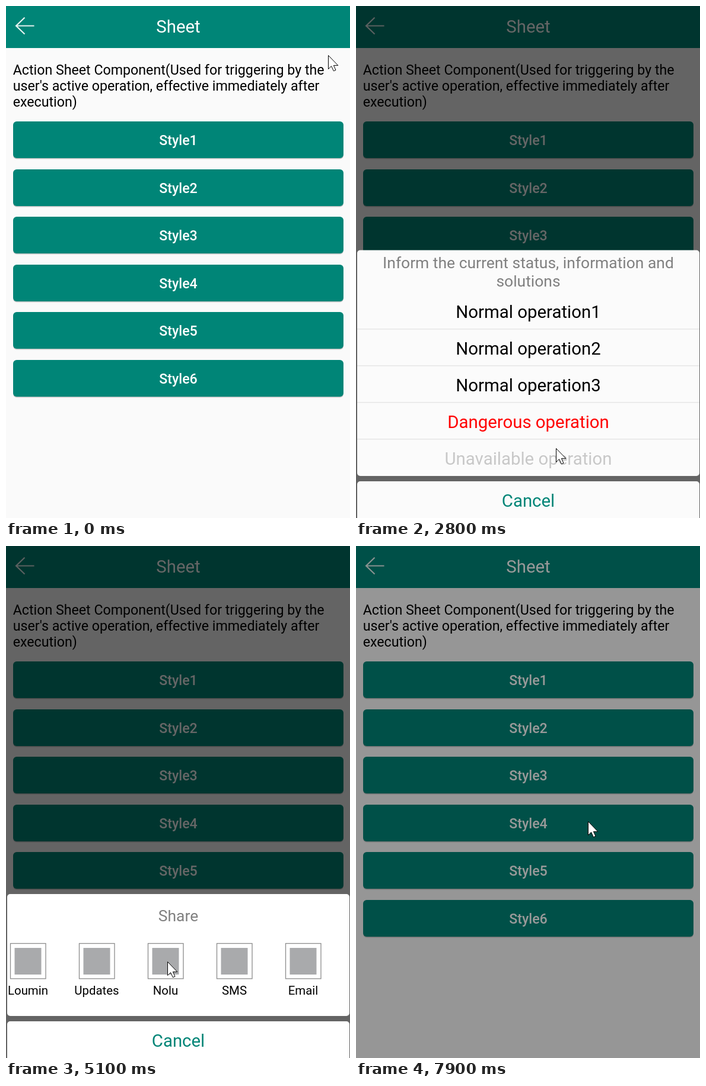
Recreate the animation shown at these times as an HTML page. Size 580x865 px, loop 8000 ms.

```html
<!DOCTYPE html>
<html lang="en">
<head>
<meta charset="utf-8">
<title>Sheet</title>
<style>
html, body { margin: 0; width: 100%; height: 100%; overflow: hidden; }
svg { display: block; width: 580px; height: 865px; background: #fafafa; font-family: Roboto, sans-serif; }
</style>
</head>
<body>
<svg id="stage" viewBox="0 0 580 865"></svg>
<script>
const LOOP = 8000, STEP = 100, MID = 290.5, DIM = 0.6;
const SMALL = 23.2, MEDIUM = 26.45, LARGE = 29.4;
const TEAL = '#008577', GRAY = '#808080', PALE = '#c8c8c8';
const stage = document.getElementById('stage');

function add(parent, tag, attrs, content) {
  const el = document.createElementNS('http://www.w3.org/2000/svg', tag);
  for (const key in attrs) el.setAttribute(key, attrs[key]);
  if (content) el.textContent = content;
  return parent.appendChild(el);
}
const rect = (parent, x, y, width, height, fill, rx = 0, more = {}) =>
  add(parent, 'rect', { x, y, width, height, fill, rx, ...more });
const text = (parent, str, x, y, size, fill = '#000', more = {}) =>
  add(parent, 'text', { x, y, 'font-size': size, fill, ...more }, str);
const centered = (parent, str, x, y, size, fill, more = {}) =>
  text(parent, str, x, y, size, fill, { 'text-anchor': 'middle', ...more });

// Page
rect(stage, 0, 0, 580, 71, TEAL);
add(stage, 'path', { d: 'M47.5 33.5H17M31.5 19.5L17 33.5L31.5 47.5', fill: 'none', stroke: '#e4f2f0', 'stroke-width': 2.2 });
centered(stage, 'Sheet', MID, 45, LARGE, '#fff');
['Action Sheet Component(Used for triggering by the',
 "user's active operation, effective immediately after",
 'execution)'].forEach((line, i) => text(stage, line, 11.7, 115.5 + 27 * i, SMALL));
for (let i = 0; i < 6; i++) {
  const y = Math.round(195 + 80.6 * i);
  rect(stage, 12, y + 1.5, 557, 62, '#000', 6, { opacity: 0.22 });
  rect(stage, 12, y, 557, 62, TEAL, 6);
  centered(stage, 'Style' + (i + 1), MID, y + 39.5, SMALL, '#fff', { 'font-weight': 500 });
}
const shade = rect(stage, 0, 0, 580, 865, '#000');

// Sheets
const sheets = [];
function makeSheet(top, open, close, fill = '#fff') {
  const g = add(stage, 'g', {});
  rect(g, 2, top, 577, 794 - top, fill, 5);
  rect(g, 2, 803, 577, 72, fill, 5);
  centered(g, 'Cancel', MID, 846, LARGE, TEAL);
  sheets.push({ g, top, open, close });
  return g;
}
function addRows(g) {
  ['Normal operation1', 'Normal operation2', 'Normal operation3',
   'Dangerous operation', 'Unavailable operation'].forEach((label, i) => {
    centered(g, label, MID, 527 + 62 * i, LARGE, ['#000', '#000', '#000', '#f00', PALE][i]);
    if (i) rect(g, 2, 483 + 62 * i, 577, 1.5, '#e6e6e6');
  });
}

addRows(makeSheet(484, 700, 1600, '#fbfbfb'));

const info = makeSheet(412.5, 2200, 3200, '#fbfbfb');
centered(info, 'Inform the current status, information and', MID, 443, MEDIUM, GRAY);
centered(info, 'solutions', MID, 474, MEDIUM, GRAY);
addRows(info);

const share = makeSheet(588, 4000, 5400);
centered(share, 'Share', MID, 634, MEDIUM, GRAY);
add(add(stage, 'clipPath', { id: 'card' }), 'rect', { x: 2, y: 588, width: 577, height: 206 });
const strip = add(add(share, 'g', { 'clip-path': 'url(#card)' }), 'g', {});
['VV', 'Loumin', 'Updates', 'Nolu', 'SMS', 'Email'].forEach((label, i) => {
  const x = 79 + 116 * i;
  rect(strip, x - 29.5, 671.5, 59.5, 59.5, '#fff', 0, { stroke: '#8c8c8c', 'stroke-width': 1.3 });
  rect(strip, x - 22.5, 679, 45, 45, '#a9aaac');
  centered(strip, label, x, 757.5, 20.4);
});

const file = makeSheet(458, 6200, 7800);
centered(file, 'File name', MID, 504, MEDIUM, GRAY);
text(file, 'Link address:', 19.7, 567, MEDIUM);
['https://www.baidu.com/link?url', '=eZH1yw2u1h-CNrpm7Q3jD', '_EfVnUxwUuBHlTGhLlA',
 '_KfhwtG0TGSl4a7kPsJNMqE8&wd', '=&eqid=f50ccdfc00009400000000', '065b232f14'
].forEach((line, i) => text(file, line, 195, 567 + 27 * i, SMALL, PALE));
text(file, 'Retrieve password:', 19.5, 760, MEDIUM);
rect(file, 262.5, 724.5, 127.5, 51, '#7accbd');
centered(file, '3854', 326, 759, SMALL);
rect(file, 484, 728.5, 76, 43, '#fefefe', 21.5, { stroke: '#f3f3f3' });

const pointer = add(stage, 'path', {
  d: 'M.5 .5V23.5L5.6 18.6L9.4 26.8L13 25.2L9.4 17.4H16.8Z', fill: '#fff', stroke: '#000'
});

// Pointer stops: time, x, y
const route = [
  [0, 543, 83], [400, 401, 234], [600, 401, 234], [1400, 356, 458], [1700, 356, 458],
  [2000, 350, 300], [2100, 350, 300], [2800, 337, 747], [3100, 337, 747],
  [3700, 341, 385], [3900, 341, 385], [4200, 341, 493], [4800, 430, 700],
  [5100, 272, 702], [5200, 272, 702], [5800, 339, 459], [6100, 339, 459],
  [6800, 376, 674], [6900, 376, 674], [7100, 385, 537], [7300, 393, 451],
  [7600, 393, 451], [7900, 391, 465]
];
const clamp = v => Math.min(1, Math.max(0, v));

function pointerAt(t) {
  const i = route.findIndex(stop => stop[0] > t);
  if (i < 0) return route[route.length - 1].slice(1);
  const [t0, x0, y0] = route[i - 1], [t1, x1, y1] = route[i];
  const k = (t - t0) / (t1 - t0);
  return [Math.round(x0 + (x1 - x0) * k), Math.round(y0 + (y1 - y0) * k)];
}

function draw(t) {
  let dim = 0;
  for (const { g, top, open, close } of sheets) {
    const shown = clamp((t - open + 50) / 200) * (1 - clamp((t - close + 50) / 100));
    g.setAttribute('visibility', shown > 0 ? 'visible' : 'hidden');
    g.setAttribute('transform', `translate(0 ${(865 - top) * (1 - shown)})`);
    dim += DIM * clamp((t - open - 100) / 500) * (1 - clamp((t - close + 50) / 450));
  }
  shade.setAttribute('opacity', dim);
  strip.setAttribute('transform', `translate(${-158 * clamp((t - 4800) / 300)} 0)`);
  pointer.setAttribute('transform', `translate(${pointerAt(t)})`);
}

const start = performance.now();
function tick() {
  const t = (performance.now() - start) % LOOP;
  draw(Math.floor(t / STEP) * STEP);
  requestAnimationFrame(tick);
}
tick();
</script>
</body>
</html>
```
